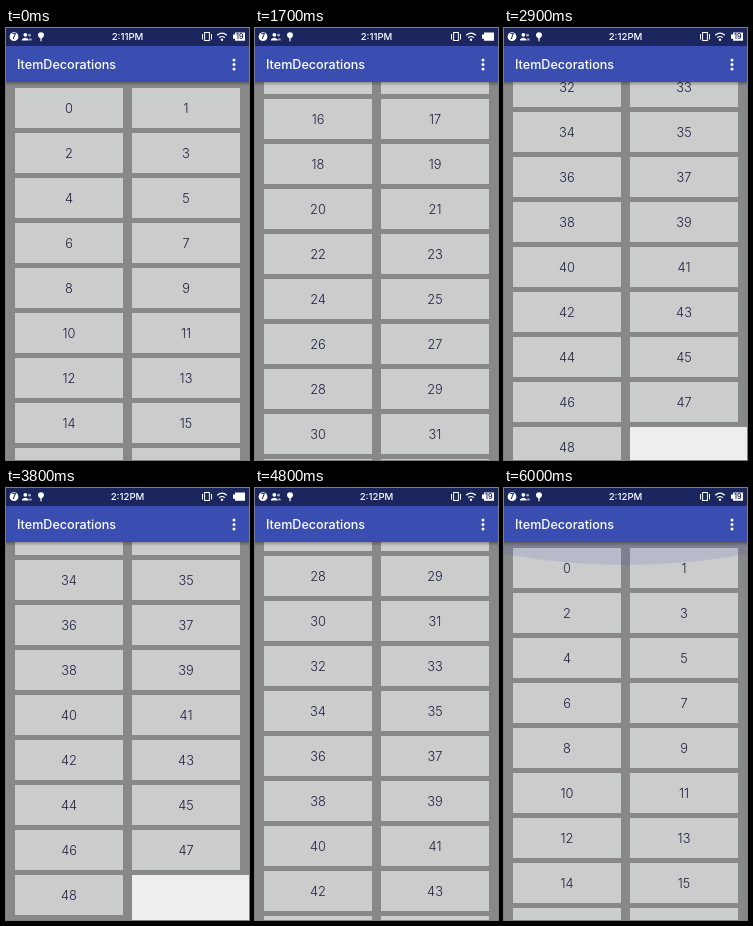
Write an HTML page that moves like this. It is 243 px wide and 432 px high and loops after 6.1 s.

```html
<!DOCTYPE html>
<html lang="en">
<head>
<meta charset="utf-8">
<title>ItemDecorations</title>
<style>
  html, body { margin: 0; width: 100%; height: 100%; overflow: hidden; }
  body { position: relative; background: #eee; font-family: Inter, Roboto, sans-serif; }
  #list { position: absolute; left: 0; top: 0; width: 243px; }
  .fill { position: absolute; left: 0; top: 0; background: #888; }
  .cell {
    position: absolute; width: 108px; height: 40px;
    background: #cbcdcc; color: #1c2040;
    font-size: 12.8px; font-weight: 300; line-height: 41px; text-align: center;
  }
  #chrome, #glow { position: absolute; left: 0; top: 0; width: 243px; height: 432px; }
</style>
</head>
<body>
<div id="list"></div>
<svg id="glow" viewBox="0 0 243 432"><path fill="#3f51b5"/></svg>
<svg id="chrome" viewBox="0 0 243 432">
  <defs>
    <linearGradient id="shade" x2="0" y2="1">
      <stop stop-color="#000" stop-opacity=".3"/>
      <stop offset="1" stop-color="#000" stop-opacity="0"/>
    </linearGradient>
  </defs>
  <rect y="54" width="243" height="4" fill="url(#shade)"/>
  <rect y="18" width="243" height="36" fill="#3a4db1"/>
  <rect width="243" height="18" fill="#1b265f"/>
  <g fill="#fff">
    <text x="11" y="41.4" font-size="12.6" font-weight="500">ItemDecorations</text>
    <circle cx="228" cy="32" r="1.5"/>
    <circle cx="228" cy="36.5" r="1.5"/>
    <circle cx="228" cy="41" r="1.5"/>
    <text id="clock" x="121.5" y="12.4" font-size="9.6" font-weight="500" text-anchor="middle">2:11PM</text>
    <circle cx="8" cy="8.7" r="4.4"/>
    <text x="8" y="11.2" font-size="7" font-weight="700" fill="#1b265f" text-anchor="middle">7</text>
    <circle cx="19.3" cy="6.8" r="1.9"/>
    <path d="M16 12.5v-1.2q3.3-3 6.6 0v1.2z"/>
    <g opacity=".6"><circle cx="23.6" cy="7.2" r="1.4"/><path d="M23.2 12.5v-2q2-.6 2.6 1v1z"/></g>
    <path d="M35 4.2a3 3 0 0 1 3 3q0 2-2.4 3.4v2.6h-1.2v-2.6q-2.4-1.4-2.4-3.4a3 3 0 0 1 3-3z"/>
    <circle cx="216" cy="11.8" r="1.2"/>
    <path d="M229 4.6h10v8.2h-10v-2h-2v-4.2h2z"/>
  </g>
  <g fill="none" stroke="#fff">
    <rect x="198.6" y="4.5" width="4.8" height="8"/>
    <path d="M196.5 6v5.5M205.5 6v5.5"/>
    <path d="M211.2 7.3q4.8-4.2 9.6 0M213.2 9.7q2.8-2.4 5.6 0" stroke-width="1.2"/>
  </g>
  <text id="charge" x="233.8" y="11.2" font-size="7" font-weight="600" fill="#1b265f" text-anchor="middle">19</text>
</svg>
<script>
const LOOP = 6100, STEP = 100, PITCH = 45, TOP = 60, COUNT = 49;
const $ = id => document.getElementById(id);
const list = $('list'), glow = $('glow'), arc = glow.firstElementChild;

function box(cls, style, text = '') {
  const el = document.createElement('div');
  el.className = cls;
  el.textContent = text;
  for (const k in style) el.style[k] = style[k] + 'px';
  list.append(el);
}

const lastTop = TOP + PITCH * Math.floor(COUNT / 2);
box('fill', { width: 243, height: lastTop });
box('fill', { width: 126, height: lastTop + PITCH });
for (let i = 0; i < COUNT; i++) {
  box('cell', { left: i % 2 ? 126 : 9, top: TOP + PITCH * (i >> 1) }, i);
}

// [time, scroll offset]
const path = [
  [700, 0], [800, 4], [1000, 46], [1700, 349], [2400, 671], [2700, 729], [3300, 753],
  [3800, 753], [4300, 716], [4800, 622], [5300, 290], [5700, 8], [5800, 0], [6100, 0]
];

const slope = i => (path[i + 1][1] - path[i][1]) / (path[i + 1][0] - path[i][0]);
function tangent(i) {
  if (i === 0 || i === path.length - 1) return 0;
  const a = slope(i - 1), b = slope(i);
  return a * b > 0 ? 2 * a * b / (a + b) : 0;
}

// Monotone cubic through the path points
function scrollAt(t) {
  if (t <= path[0][0]) return 0;
  const i = path.findIndex((p, k) => k < path.length - 1 && t < path[k + 1][0]);
  const [t0, y0] = path[i], [t1, y1] = path[i + 1];
  const h = t1 - t0, u = (t - t0) / h, v = 1 - u;
  return v * v * (1 + 2 * u) * y0 + u * u * (3 - 2 * u) * y1
    + h * u * v * (v * tangent(i) - u * tangent(i + 1));
}

function drawGlow(t) {
  const on = t >= 5700;
  glow.style.visibility = on ? 'visible' : 'hidden';
  if (!on) return;
  const depth = 22 * Math.min(1, (t - 5600) / 200);
  const edge = 55 + depth / 2;
  arc.setAttribute('d', `M0 54V${edge}Q121.5 ${edge + depth} 243 ${edge}V54z`);
  arc.setAttribute('opacity', t < 6000 ? 0.2 : 0.14);
}

// The battery level blinks off twice per loop
const charging = t => (t >= 1500 && t < 2100) || (t >= 3600 && t < 4200);

function draw(now) {
  const t = Math.floor(now % LOOP / STEP) * STEP;
  list.style.transform = `translateY(${-Math.round(scrollAt(t))}px)`;
  drawGlow(t);
  $('clock').textContent = t < 2200 ? '2:11PM' : '2:12PM';
  $('charge').style.visibility = charging(t) ? 'hidden' : 'visible';
}

const start = performance.now();
function tick() {
  draw(performance.now() - start);
  requestAnimationFrame(tick);
}
tick();
</script>
</body>
</html>
```
